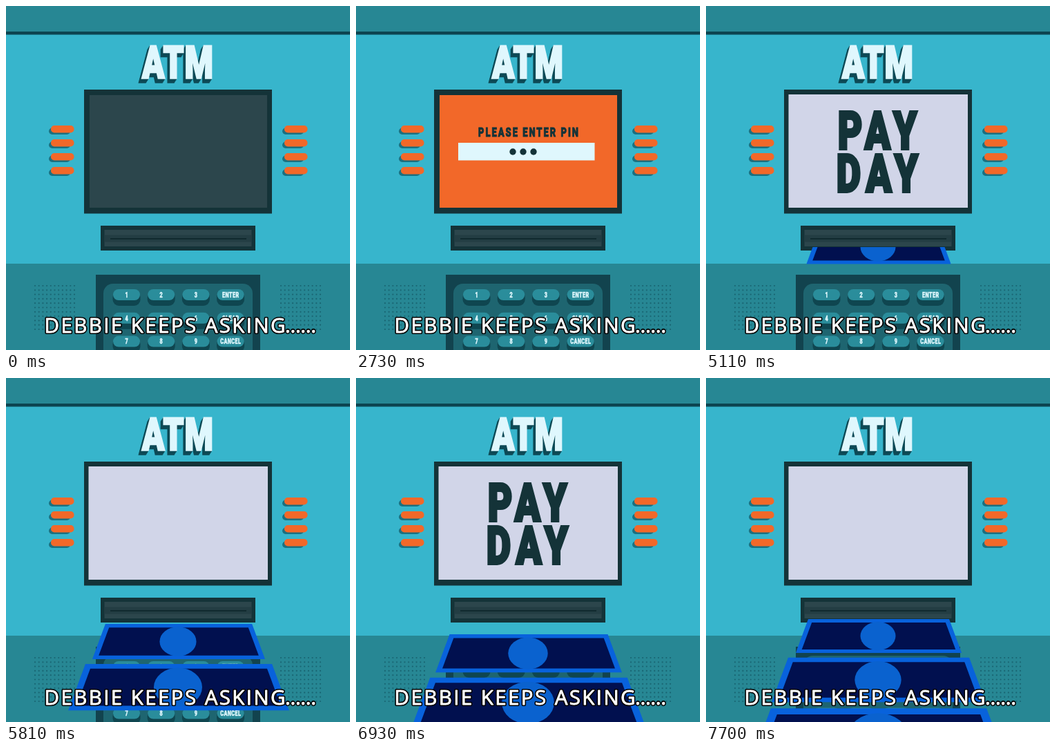
Animation, 498 px wide and 498 px high, one loop 7770 ms. Source, as an HTML page with a canvas:

```html
<!DOCTYPE html>
<html lang="en">
<head>
<meta charset="utf-8">
<title>ATM</title>
<style>
  html, body { margin: 0; width: 100%; height: 100%; overflow: hidden; background: #37b5cc; }
  canvas { display: block; width: 498px; height: 498px; }
</style>
</head>
<body>
<canvas id="stage" width="498" height="498"></canvas>
<script>
const ctx = document.getElementById('stage').getContext('2d');
const LOOP = 7770, TICK = 70;
const TEAL = '#278794', INK = '#143338', GLASS = '#2c464c', ORANGE = '#f26829',
      ICE = '#dff7fd', LILAC = '#d1d5e8';
const SCREEN = [121, 129, 257, 163];
const CONDENSED = 0.72;

function box(x, y, w, h, color, r = 0) {
  ctx.fillStyle = color;
  ctx.beginPath();
  ctx.roundRect(x, y, w, h, r);
  ctx.fill();
}

function dot(x, y, r, color) {
  ctx.fillStyle = color;
  ctx.beginPath();
  ctx.arc(x, y, r, 0, Math.PI * 2);
  ctx.fill();
}

function poly(points, color) {
  ctx.fillStyle = color;
  ctx.beginPath();
  points.forEach(([x, y]) => ctx.lineTo(x, y));
  ctx.closePath();
  ctx.fill();
}

// Condensed extra-heavy lettering, centred on x
function sign(text, x, base, size, gap, color) {
  ctx.save();
  ctx.translate(x, base);
  ctx.scale(CONDENSED, 1);
  ctx.font = `900 ${size}px Roboto, "Liberation Sans", sans-serif`;
  ctx.letterSpacing = gap / CONDENSED + 'px';
  ctx.fillStyle = ctx.strokeStyle = color;
  ctx.lineWidth = size * 0.05;
  ctx.textAlign = 'left';
  const left = -(ctx.measureText(text).width - gap / CONDENSED) / 2;
  ctx.strokeText(text, left, 0);
  ctx.fillText(text, left, 0);
  ctx.restore();
}

function noise(i) {
  const v = Math.sin(i * 127.1 + 11.7) * 43758.5453;
  return v - Math.floor(v);
}

function inScreen(draw) {
  ctx.save();
  ctx.beginPath();
  ctx.rect(...SCREEN);
  ctx.clip();
  draw();
  ctx.restore();
}

function drawKeypad() {
  box(130, 389, 238, 120, '#12434e');
  box(141, 402, 216, 120, '#1e6570', 14);
  const rows = [['1', '2', '3', 'ENTER'], ['4', '5', '6', 'CLEAR'], ['7', '8', '9', 'CANCEL']];
  rows.forEach((row, j) => row.forEach((key, i) => {
    const x = 174.5 + i * 50.2, y = 410 + j * 33.8;
    box(x - 20, y + 3, 40, 21, '#0f4650', 9);
    box(x - 19.5, y, 39, 16, '#2a8d9b', 8);
    sign(key, x, y + 11.8, 10, 0.5, ICE);
  }));
}

function drawMachine() {
  box(0, 0, 498, 498, '#37b5cc');
  box(0, 0, 498, 37, TEAL);
  box(0, 37, 498, 4.5, '#0c4450');
  box(0, 373, 498, 125, TEAL);

  for (let k = 6; k >= 0; k--) {
    sign('ATM', 248.5 - k * 0.65, 104 + k * 0.95, 65, 1.5, k ? '#0e4a56' : ICE);
  }

  for (const x of [65, 403]) {
    for (let i = 0; i < 4; i++) {
      const y = 173 + i * 20;
      box(x - 3, y + 3.5, 31, 9.5, '#1b7080', 5);
      box(x, y, 33.5, 10.5, ORANGE, 5);
    }
  }

  for (const x of [42, 398]) {
    for (let i = 0; i < 11; i++) {
      for (let j = 0; j < 11; j++) dot(x + i * 5.7, 405 + j * 6.3, 1.1, '#1a6572');
    }
  }

  box(113, 121, 272, 179.5, INK);
  box(...SCREEN, GLASS);

  box(137, 318, 224, 36, INK);
  box(142.5, 324, 213, 24, GLASS);
  box(142.5, 331.5, 213, 10, '#233d43');
  box(151, 336, 197, 2, '#112a2f');

  drawKeypad();
}

function drawPin(n) {
  box(...SCREEN, ORANGE);
  sign('PLEASE ENTER PIN', 249.5, 188.5, 18, 2, INK);
  box(148, 198, 197.5, 25.5, ICE);
  const typed = Math.max(0, Math.min(4, Math.floor((n - 26) / 4)));
  for (let i = 0; i < typed; i++) dot(227 + i * 15, 211, 4.7, INK);
}

// Torn picture while the pale screen drops in
function drawTear(n) {
  box(...SCREEN, ORANGE);
  [...'PLEASE ENTER PIN'].forEach((c, i) => {
    const y = 178 + (noise(i) - 0.5) * 9;
    ctx.save();
    ctx.translate(181 + i * 9.1, y);
    ctx.rotate((noise(i + 40) - 0.5) * 0.45);
    sign(c, 0, 0, 18, 0, INK);
    ctx.restore();
  });
  box(147, 194, 199, 18, ICE);
  box(175, 188, 14, 35, ICE);
  box(198, 184, 76, 20, ICE);
  box(272, 183, 55, 36, ICE);
  box(322, 190, 22, 34, ICE);
  box(196, 211, 78, 8, ORANGE);
  [[227, 197], [238, 196], [258, 204], [272, 207]].forEach(([x, y]) => dot(x, y, 4.2, INK));

  const drop = [12, 28, 80, 130][n - 60];
  const edge = [[121, 129]], scrap = [[124, 287]];
  for (let i = 0, x = 121; x < 378; i++) {
    const y = 129 + drop + (noise(i + 80) - 0.5) * 14;
    edge.push([x, y]);
    x = Math.min(378, x + 6 + noise(i + 120) * 20);
    edge.push([x, y]);
  }
  edge.push([378, 129]);
  for (let x = 124; x < 372; x += 5) scrap.push([x, 278 + noise(x) * 5]);
  scrap.push([372, 286]);
  for (let x = 367; x > 124; x -= 8) scrap.push([x, 285 + noise(x + 9) * 3]);
  poly(scrap, GLASS);
  box(219, 276, 10, 13, ORANGE);
  poly(edge, LILAC);
}

function drawScreen(n) {
  if (n < 27) {
    if (n >= 6) sign('WELCOME', 250.5, 224.5, 48, 4.8, ICE);
    if (n >= 19) {
      const p = Math.min(1, (n - 19) / 6), e = p * p * (3 - 2 * p);
      const w = 11 + 246 * e, h = 9 + 154 * e;
      box(249.5 - w / 2, 292 - h, w, h, ORANGE);
    }
  } else if (n < 60) {
    inScreen(() => drawPin(n));
  } else if (n < 64) {
    inScreen(() => drawTear(n));
  } else {
    box(119.5, 128, 259.5, 164, LILAC);
    if (n >= 70 && n % 14 < 7) {
      sign('PAY', 248, 206.5, 76, 8, INK);
      sign('DAY', 248, 269, 76, 8, INK);
    }
  }
}

function drawNote(top, s) {
  const x = 250, h = 49 * s, d = top - 349;
  const edge = 102 + 0.6 * d - 0.0014 * d * d;
  const sheet = (inset, side, color) => {
    const a = top + inset, b = top + h - inset;
    const wa = edge + 0.37 * inset - side, wb = edge + 0.37 * (h - inset) - side;
    poly([[x - wa, a], [x + wa, a], [x + wb, b], [x - wb, b]], color);
  };
  sheet(0, 0, '#0862dc');
  sheet(5 * s, 7 * s, '#01104f');
  ctx.fillStyle = '#0a62cf';
  ctx.beginPath();
  ctx.ellipse(x - 1, top + h / 2, 25.5 * s, 20.5 * s, 0, 0, Math.PI * 2);
  ctx.fill();
}

// A new note leaves the slot every seven ticks and grows in perspective
function drawNotes(n) {
  ctx.save();
  ctx.beginPath();
  ctx.rect(0, 349, 498, 149);
  ctx.clip();
  for (let start = 75; start <= 115; start += 7) {
    const p = (n - start) / 7;
    if (p <= -4 / 7 || p > 2.6) continue;
    if (p < 0) {
      drawNote(349 + 49 * p * 7 / 4, 1);
    } else {
      const s = Math.pow(1.32, p);
      drawNote(175 + 174 * s, s);
    }
  }
  ctx.restore();
}

// Outlined text; returns the x where it ends
function outlined(text, x, base, gap) {
  ctx.letterSpacing = gap + 'px';
  ctx.lineWidth = 4;
  ctx.strokeStyle = '#000';
  ctx.strokeText(text, x, base);
  ctx.lineWidth = 0.9;
  ctx.strokeStyle = '#fff';
  ctx.strokeText(text, x, base);
  ctx.fillText(text, x, base);
  return x + ctx.measureText(text).width;
}

function drawCaption() {
  ctx.save();
  ctx.font = '29.5px "Open Sans", "Noto Sans", sans-serif';
  ctx.textAlign = 'left';
  ctx.lineJoin = 'round';
  ctx.fillStyle = '#fff';
  const end = outlined('DEBBIE KEEPS ASKING', 55.5, 473, 2.4);
  outlined('......', end - 3, 473, -0.4);
  ctx.restore();
}

function frame(now) {
  const n = Math.floor((now % LOOP) / TICK);
  drawMachine();
  drawScreen(n);
  drawNotes(n);
  drawCaption();
  requestAnimationFrame(frame);
}
requestAnimationFrame(frame);
</script>
</body>
</html>
```
